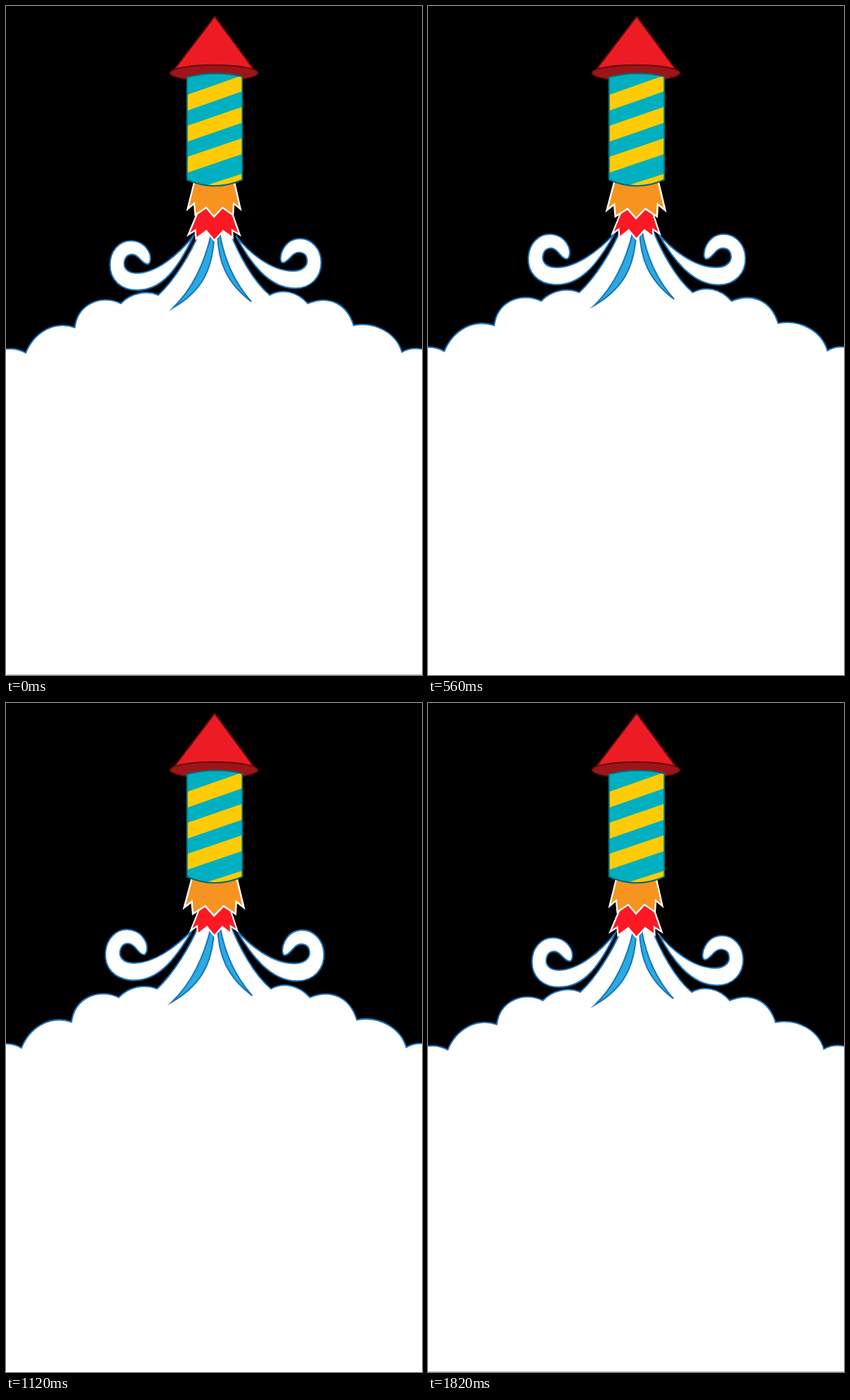
Recreate the animation shown at these times as an HTML page with a canvas. Size 590x949 px, loop 1920 ms.

```html
<!DOCTYPE html>
<html lang="en">
<head>
<meta charset="utf-8">
<title>Rocket</title>
<style>
html, body { margin: 0; width: 100%; height: 100%; overflow: hidden; background: #000; }
canvas { display: block; }
</style>
</head>
<body>
<canvas id="stage" width="590" height="949"></canvas>
<script>
const ctx = document.getElementById('stage').getContext('2d');
const STEP = 70, LOOP = 1920, HALF = 13;
const BLUE = '#1c75bc';

const outline =
  'M-8 488C4 485 16 485 28 492C40 463 68 446 97.5 456' +
  'C102 422 135 409 163 422C177 407 199 403 216 410C240 388 262 350 274 322L278 312' +
  'H314L318 322C330 352 350 390 374 410C391 401 412 404 428 422' +
  'C457 410 483 421 493 453C525 447 554 465 561.5 491C572 485 584 484 598 489';
const cloudLine = new Path2D(outline);
const cloudFill = new Path2D(outline + 'V948.75H-8Z');

const streaks = new Path2D(
  'M237 428C263 403 281 368 291.5 322L295.5 322C294 368 282 402 237 428Z' +
  'M348 419.5C327 396 310 363 303 322L300 322C300.5 363 313 393 348 419.5Z');

const leftCurl = new Path2D(
  'M266 326C245 352 214 379 185 379C172 379 166 371 168 362C170 352 180 349 188 357' +
  'C194 363 198 367 202 366C206 363 206 353 201 346C196 338 187 333 177 333' +
  'C160 333 147.5 348 147.5 367C147.5 389 163 403 186 403C222 403 244 372 266 326Z');
const rightCurl = new Path2D(
  'M326 326C343 348 375 376 407 376C420 376 428 369 427 360C426 348 413 347 406 354' +
  'C400 360 396 365 392 364C388 362 389 352 393 345C398 336 406 330 417 330' +
  'C434 330 447 345 447 364C447 385 432 400.5 410 400.5C372 400.5 345 362 326 326Z');

const redFlame = new Path2D(
  'M276 283L258.5 324.5L268.5 318L269.5 330L284 319L295.5 332.5L308 319L321.5 329L321 318L331.5 324.5L317 283Z');
const orangeFlame = new Path2D(
  'M268 246L257.5 288L267 280L268.5 296.5L284 286L295 299L307 286L322 296.5L323 280L332.5 288L323 246Z');

const cone = new Path2D('M296 15L235 95H355Z');
const rim = new Path2D();
rim.ellipse(295, 95, 62, 11.3, 0, 0, Math.PI * 2);
const tube = new Path2D('M256.7 101Q296 91 335.2 100V246.5Q296 264 256.7 246.5Z');

function paint(path, fill, stroke, width) {
  ctx.fillStyle = fill;
  ctx.fill(path);
  ctx.strokeStyle = stroke;
  ctx.lineWidth = width;
  ctx.stroke(path);
}

// Scale and turn about a pivot, then shift
function placed(x, y, sx, sy, turn, dx, dy, draw) {
  ctx.save();
  ctx.translate(x + dx, y + dy);
  ctx.rotate(turn);
  ctx.scale(sx, sy);
  ctx.translate(-x, -y);
  draw();
  ctx.restore();
}

function drawSmoke(p) {
  placed(268, 325, 1 + .024 * p, 1 + .024 * p, .103 * p, -1.6 * p, -5.7 * p,
    () => paint(leftCurl, '#fff', BLUE, 2));
  placed(323, 323, 1 + .028 * p, 1 + .028 * p, -.043 * p, 0, -6.3 * p,
    () => paint(rightCurl, '#fff', BLUE, 2));
  placed(295, 610, 1 + .03 * p, 1 + .03 * p, 0, 0, 0, () => {
    ctx.fillStyle = '#fff';
    ctx.fill(cloudFill);
    ctx.strokeStyle = BLUE;
    ctx.lineWidth = 2;
    ctx.stroke(cloudLine);
    paint(streaks, '#29abe2', BLUE, 2);
  });
}

function drawFlames(p) {
  placed(295, 285, 1 - .125 * p, 1 - .06 * p, 0, 0, 0,
    () => paint(redFlame, '#fd1924', '#fff', 2.3));
  placed(295, 250, 1 + .167 * p, 1 + .075 * p, 0, 0, 0,
    () => paint(orangeFlame, '#f79420', '#fff', 2.3));
}

function stripe(left, right) {
  ctx.beginPath();
  ctx.moveTo(257, left);
  ctx.lineTo(335, right);
  ctx.lineTo(335, right + 22.5);
  ctx.lineTo(257, left + 22.5);
  ctx.fill();
}

function drawRocket() {
  paint(cone, '#ed1c24', '#6a0b0d', 2);
  paint(rim, '#9d1519', '#6a0b0d', 2);
  ctx.save();
  ctx.clip(tube);
  ctx.fillStyle = '#00b0c0';
  ctx.fillRect(250, 85, 95, 180);
  ctx.fillStyle = '#ffcb05';
  for (let i = 0; i < 3; i++) stripe(126 + i * 44, 98.5 + i * 44.5);
  stripe(263, 238);
  ctx.restore();
  ctx.strokeStyle = '#066b79';
  ctx.lineWidth = 2;
  ctx.stroke(tube);
}

function frame(now) {
  const i = Math.min(2 * HALF, Math.floor((now % LOOP) / STEP));
  const p = 1 - Math.abs(i - HALF) / HALF;
  ctx.fillStyle = '#000';
  ctx.fillRect(0, 0, 590, 949);
  drawSmoke(p);
  drawFlames(p);
  drawRocket();
}

let start;
function tick(now) {
  if (start === undefined) start = now;
  frame(Math.max(0, now - start));
  requestAnimationFrame(tick);
}
frame(0);
requestAnimationFrame(tick);
</script>
</body>
</html>
```
